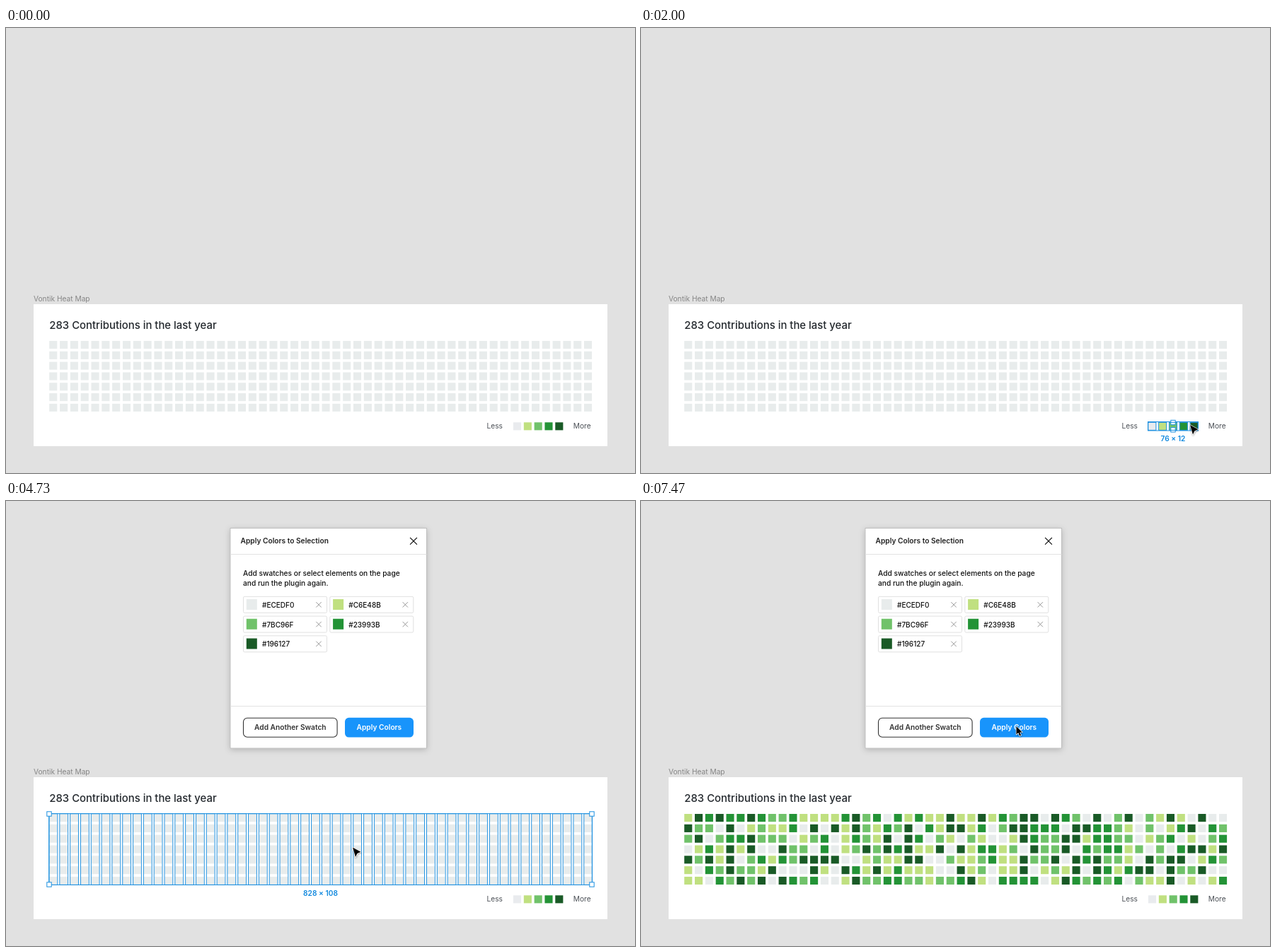
Animation of 889x630 px, one loop 8470 ms. Source, as an HTML page:

```html
<!DOCTYPE html>
<html lang="en">
<head>
<meta charset="utf-8">
<title>Apply Colors</title>
<style>
  html, body { margin: 0; width: 100%; height: 100%; overflow: hidden; background: #e1e1e1; }
  svg { display: block; width: 889px; height: 630px; }
  text { font-family: Inter, "Open Sans", sans-serif; font-size: 10.2px; }
  .outline { fill: none; stroke: #1b8fe0; }
  .handle { fill: #fff; stroke: #1b8fe0; }
  .size { fill: #0f88de; font-weight: 600; text-anchor: middle; }
  .cursor { fill: #000; stroke: #fff; stroke-width: 1.3; stroke-linejoin: round; paint-order: stroke; }
</style>
</head>
<body>
<svg id="stage" viewBox="0 0 889 630">
  <defs>
    <filter id="soft" x="-10%" y="-10%" width="120%" height="125%">
      <feDropShadow dx="0" dy="2" stdDeviation="4.5" flood-color="#000" flood-opacity=".2"/>
    </filter>
    <filter id="lift" x="-40%" y="-40%" width="200%" height="200%">
      <feDropShadow dx="0.3" dy="1.2" stdDeviation=".9" flood-color="#000" flood-opacity=".4"/>
    </filter>
  </defs>
</svg>
<script>
const NS = 'http://www.w3.org/2000/svg';
const TICK = 1000 / 15, TICKS = 127;
const PITCH = 14.82, CELL = 11.1, COLS = 52, ROWS = 7;
const EMPTY = '#e8ecec';
const SHADES = [EMPTY, '#c0e080', '#70c26a', '#239336', '#195a26'];
const CODES = ['#ECEDF0', '#C6E48B', '#7BC96F', '#23993B', '#196127'];
const GRID = { x: 61.2, y: 443 };
const LEGEND = { x: 717, y: 558.3 };
const stage = document.getElementById('stage');

function add(parent, tag, attrs, content) {
  const node = document.createElementNS(NS, tag);
  for (const key in attrs) node.setAttribute(key, attrs[key]);
  if (content) node.textContent = content;
  parent.appendChild(node);
  return node;
}
const group = (attrs = {}, parent = stage) => add(parent, 'g', attrs);
const rect = (parent, x, y, width, height, attrs) =>
  add(parent, 'rect', { x, y, width, height, ...attrs });
const label = (parent, x, y, content, attrs) => add(parent, 'text', { x, y, ...attrs }, content);
const outline = (parent, x, y, w, h, attrs) => rect(parent, x, y, w, h, { class: 'outline', ...attrs });
const handle = (parent, x, y) => rect(parent, x - 3.2, y - 3.2, 6.4, 6.4, { class: 'handle' });
const cross = (parent, x, y, r, attrs) =>
  add(parent, 'path', { d: `M${x - r} ${y - r}l${2 * r} ${2 * r}m0 ${-2 * r}l${-2 * r} ${2 * r}`, fill: 'none', ...attrs });
const show = (node, on) => node.setAttribute('visibility', on ? 'visible' : 'hidden');

function seeded(seed) {
  return () => {
    seed = (Math.imul(seed, 1664525) + 1013904223) >>> 0;
    return seed / 4294967296;
  };
}

function buildCard() {
  label(stage, 39, 387.4, 'Vontik Heat Map', { fill: '#858585' });
  rect(stage, 39, 391, 811, 201, { fill: '#fff' });
  label(stage, 61.3, 426.3, '283 Contributions in the last year',
    { fill: '#24292e', 'font-weight': 500, style: 'font-size:14.9px' });
  label(stage, 679.5, 567.3, 'Less', { fill: '#4a4f55' });
  label(stage, 801.8, 567.3, 'More', { fill: '#4a4f55' });
  SHADES.forEach((fill, i) => rect(stage, LEGEND.x + i * PITCH, LEGEND.y, CELL, CELL,
    { fill: i ? fill : '#e9ebee' }));
}

function buildCells() {
  const random = seeded(283), cells = [], layer = group();
  for (let c = 0; c < COLS; c++) {
    for (let r = 0; r < ROWS; r++) {
      const node = rect(layer, GRID.x + c * PITCH, GRID.y + r * PITCH, CELL, CELL);
      cells.push({ node, shade: SHADES[Math.floor(random() * 5)] });
    }
  }
  return cells;
}

function buildDialog() {
  const g = group();
  rect(g, 317, 38.5, 277.5, 311.5, { fill: '#fff', stroke: '#b5b5b5', 'stroke-width': .8, filter: 'url(#soft)' });
  rect(g, 317, 75, 277.5, 1, { fill: '#e2e2e2' });
  rect(g, 317, 290, 277.5, 1, { fill: '#e2e2e2' });
  label(g, 331.5, 60.2, 'Apply Colors to Selection', { fill: '#222', 'font-weight': 600 });
  cross(g, 576, 56.7, 4.9, { stroke: '#111', 'stroke-width': 1.2 });
  label(g, 335, 105.6, 'Add swatches or select elements on the page', { fill: '#111', 'font-weight': 500 });
  label(g, 335, 120.4, 'and run the plugin again.', { fill: '#111', 'font-weight': 500 });
  CODES.forEach((code, i) => {
    const x = 335 + (i % 2) * 122.3, y = 135 + Math.floor(i / 2) * 27.75;
    rect(g, x + .5, y + .3, 118, 23, { rx: 1.8, fill: '#fff', stroke: '#e0e0e0' });
    rect(g, x + 4.8, y + 4, 15, 15, { fill: SHADES[i] });
    label(g, x + 27, y + 15.8, code, { fill: '#111', 'font-weight': 500, style: 'font-size:10px' });
    cross(g, x + 107, y + 11.8, 3.7, { stroke: '#999', 'stroke-width': 1 });
  });
  rect(g, 335.5, 307.2, 132.6, 27, { rx: 5.5, fill: '#fff', stroke: '#333', 'stroke-width': 1.1 });
  label(g, 401.8, 324.4, 'Add Another Swatch', { fill: '#333', 'font-weight': 600, 'text-anchor': 'middle' });
  rect(g, 479, 306.8, 97, 27.8, { rx: 5.5, fill: '#1894fb' });
  label(g, 527.4, 324.4, 'Apply Colors', { fill: '#fff', 'font-weight': 600, 'text-anchor': 'middle' });
  return g;
}

function buildLegendMarks() {
  const hover = group(), parent = group(), box = group(), parts = group();
  outline(hover, 678.5, 557.5, 150, 13, { 'stroke-width': 2 });
  outline(parent, 678.5, 557.5, 150, 13, { 'stroke-dasharray': '1.5 1.5' });
  for (let i = 0; i < 5; i++) {
    outline(parts, LEGEND.x - .2 + i * PITCH, LEGEND.y, CELL, CELL);
  }
  outline(box, 716.5, 557.5, 71, 12.5);
  handle(box, 752, 558.5);
  handle(box, 752, 568.8);
  label(box, 752, 584.8, '76 × 12', { class: 'size' });
  return { hover, parent, box, parts };
}

function buildGridMarks() {
  const hover = group(), columns = group(), cells = group(), box = group();
  outline(hover, 60.8, 442.6, 768, 101, { 'stroke-width': 2 });
  for (let c = 0; c < COLS; c++) {
    const x = GRID.x - .2 + c * PITCH;
    outline(columns, x, 442.7, 11.8, 100.8, { 'stroke-width': .95 });
    for (let r = 0; r < ROWS; r++) {
      outline(cells, x - .1, GRID.y - .3 + r * PITCH, 11.8, 11.8, { style: 'stroke:#6a55e0;stroke-width:.95' });
    }
  }
  outline(box, 60.7, 442.6, 767.6, 100.8);
  for (const x of [61, 828]) for (const y of [443, 543]) handle(box, x, y);
  label(box, 444.5, 558.6, '828 × 108', { class: 'size' });
  return { hover, columns, cells, box };
}

buildCard();
const cells = buildCells();
const legend = buildLegendMarks();
const grid = buildGridMarks();
const dialog = buildDialog();
const ring = add(stage, 'circle', { fill: 'none', stroke: '#e0474c', 'stroke-width': 6 });
const dot = add(stage, 'circle', { r: 9, fill: '#c83a3c' });
const cursor = group({ filter: 'url(#lift)' });
const pen = add(cursor, 'path', { class: 'cursor', d: 'M0 0L4 13.6L6.4 8.4L11.4 6.2Z' });
const arrow = add(cursor, 'path', { class: 'cursor',
  d: 'M0 0V11.6L2.7 9.1L4.6 13.5L6.6 12.6L4.7 8.4H8.3Z' });

// Pointer stops: tick, x, y
const STOPS = [
  [4, 885, 572], [5, 877, 572], [6, 877, 572], [14, 776, 562], [53, 776, 562], [54, 776, 540],
  [62, 490, 490.5], [90, 490, 490.5], [95, 529, 342.5], [99, 530.5, 319]
];
// Clicks: first tick, duration in ticks
const CLICKS = [[16, 6], [64, 3], [105, 7]];
const COLORED = 109;

function pointer(k) {
  if (k <= STOPS[0][0]) return STOPS[0].slice(1);
  const i = STOPS.findIndex(s => s[0] >= k);
  if (i < 0) return STOPS[STOPS.length - 1].slice(1);
  const [t0, x0, y0] = STOPS[i - 1], [t1, x1, y1] = STOPS[i];
  const e = 1 - Math.pow(1 - (k - t0) / (t1 - t0), 2.5);
  return [x0 + (x1 - x0) * e, y0 + (y1 - y0) * e];
}

function drawClick(k, x, y) {
  const click = CLICKS.find(([start, span]) => k >= start && k < start + span);
  show(dot, click);
  show(ring, click);
  if (!click) return;
  const grow = Math.min((k - click[0] + 1) / 3, 1);
  for (const node of [dot, ring]) {
    node.setAttribute('cx', x - .8);
    node.setAttribute('cy', y + .6);
  }
  ring.setAttribute('r', 10 + 25 * grow);
  ring.setAttribute('opacity', k > click[0] + 3 ? 0 : .05 + .3 * (1 - grow));
}

function render(ms) {
  const k = Math.floor((ms + 5) / TICK) % TICKS;
  const between = (from, to) => k >= from && k < to;
  const [x, y] = pointer(k);

  show(legend.hover, between(11, 16));
  show(legend.parent, between(16, 30));
  show(legend.box, between(16, 45));
  show(legend.parts, between(30, 45));
  show(dialog, k >= 45);
  show(grid.hover, between(55, 64));
  show(grid.box, between(64, COLORED));
  show(grid.columns, between(71, 83));
  show(grid.cells, between(83, COLORED));
  for (const { node, shade } of cells) {
    node.setAttribute('fill', k >= COLORED ? shade : EMPTY);
  }

  drawClick(k, x, y);
  const visible = between(4, 45) || k >= 55;
  const onDialog = y < 350;
  cursor.setAttribute('transform', `translate(${x} ${y})`);
  show(pen, visible && !onDialog);
  show(arrow, visible && onDialog);
}

const start = performance.now();
function loop() {
  render((performance.now() - start) % 8470);
  requestAnimationFrame(loop);
}
loop();
</script>
</body>
</html>
```
